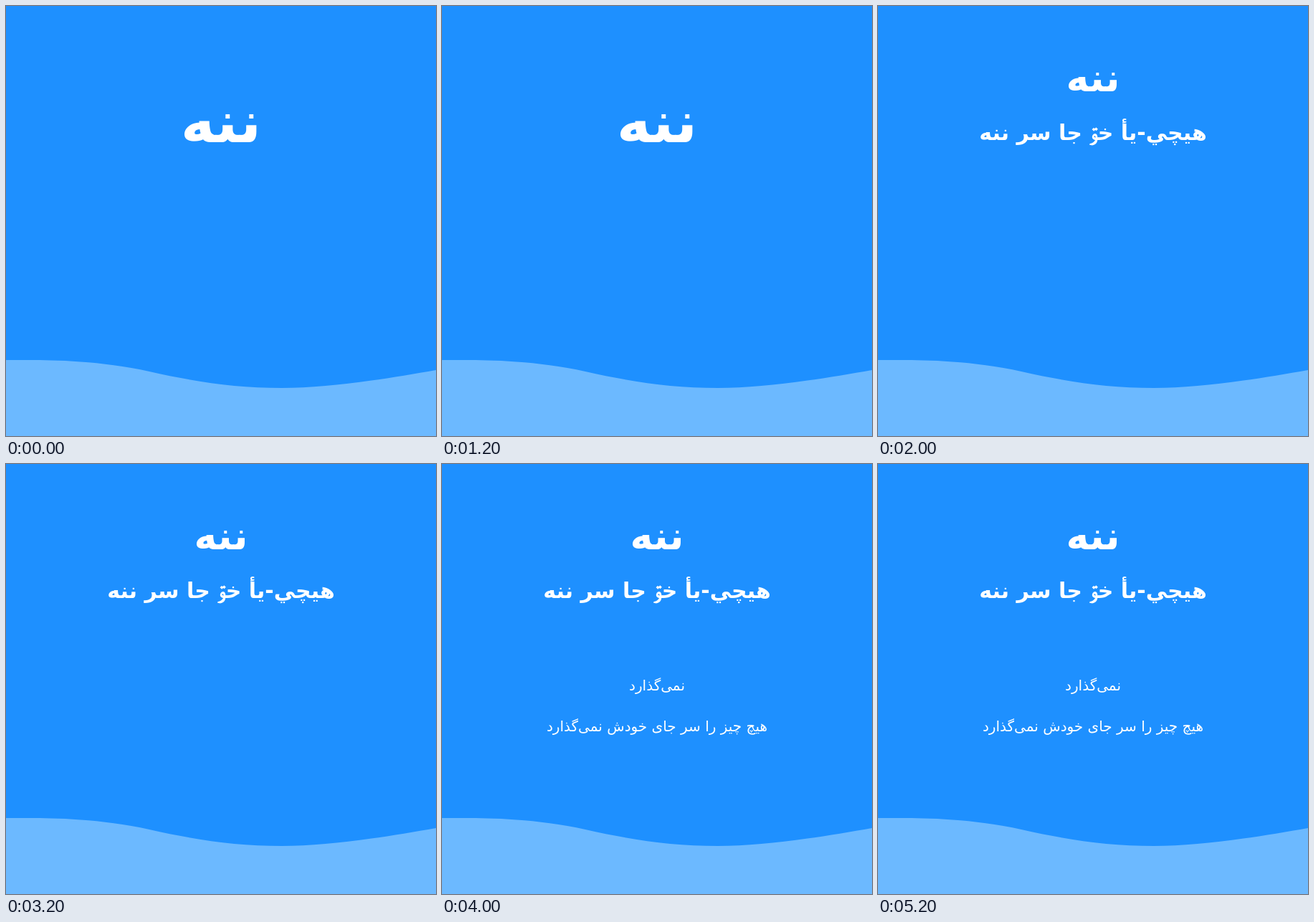
Write an HTML page that moves like this. It is 600 px wide and 600 px high and loops after 6 s.

```html
<!DOCTYPE html>
<html lang="glk">
<head>
<meta charset="utf-8">
<style>
  html, body { margin: 0; height: 100%; overflow: hidden; background: #1e90ff; }
  svg { display: block; width: 100vw; height: 100vh; }
  text { fill: #fff; font-family: "DejaVu Sans", sans-serif; text-anchor: middle; direction: rtl; }
  .bold { font-weight: bold; }
</style>
</head>
<body>
<svg viewBox="0 0 600 600">
  <path fill="#6cb9ff" d="M0 494H33C66 494 133 495 200 510C267 525 320 533 385 533C450 533 533 520 600 508V600H0Z"/>
  <text id="word" class="bold" x="300">ننه</text>
  <text id="phrase" class="bold" x="300" y="187" font-size="30">هيچي-يأ خۊ جا سر ننه</text>
  <g id="meaning" font-size="20">
    <text x="300" y="316">نمی&zwnj;گذارد</text>
    <text x="300" y="373">هیچ چیز را سر جای خودش نمی&zwnj;گذارد</text>
  </g>
</svg>
<script>
  const STEP = 2000;
  const [word, phrase, meaning] = ["word", "phrase", "meaning"].map(id => document.getElementById(id));
  const show = (el, on) => el.setAttribute("visibility", on ? "visible" : "hidden");

  function draw(now) {
    const step = Math.floor(now / STEP) % 3;
    word.setAttribute("y", step ? 119 : 190);
    word.setAttribute("font-size", step ? 54 : 81);
    show(phrase, step > 0);
    show(meaning, step > 1);
    requestAnimationFrame(() => draw(performance.now()));
  }
  draw(performance.now());
</script>
</body>
</html>
```
